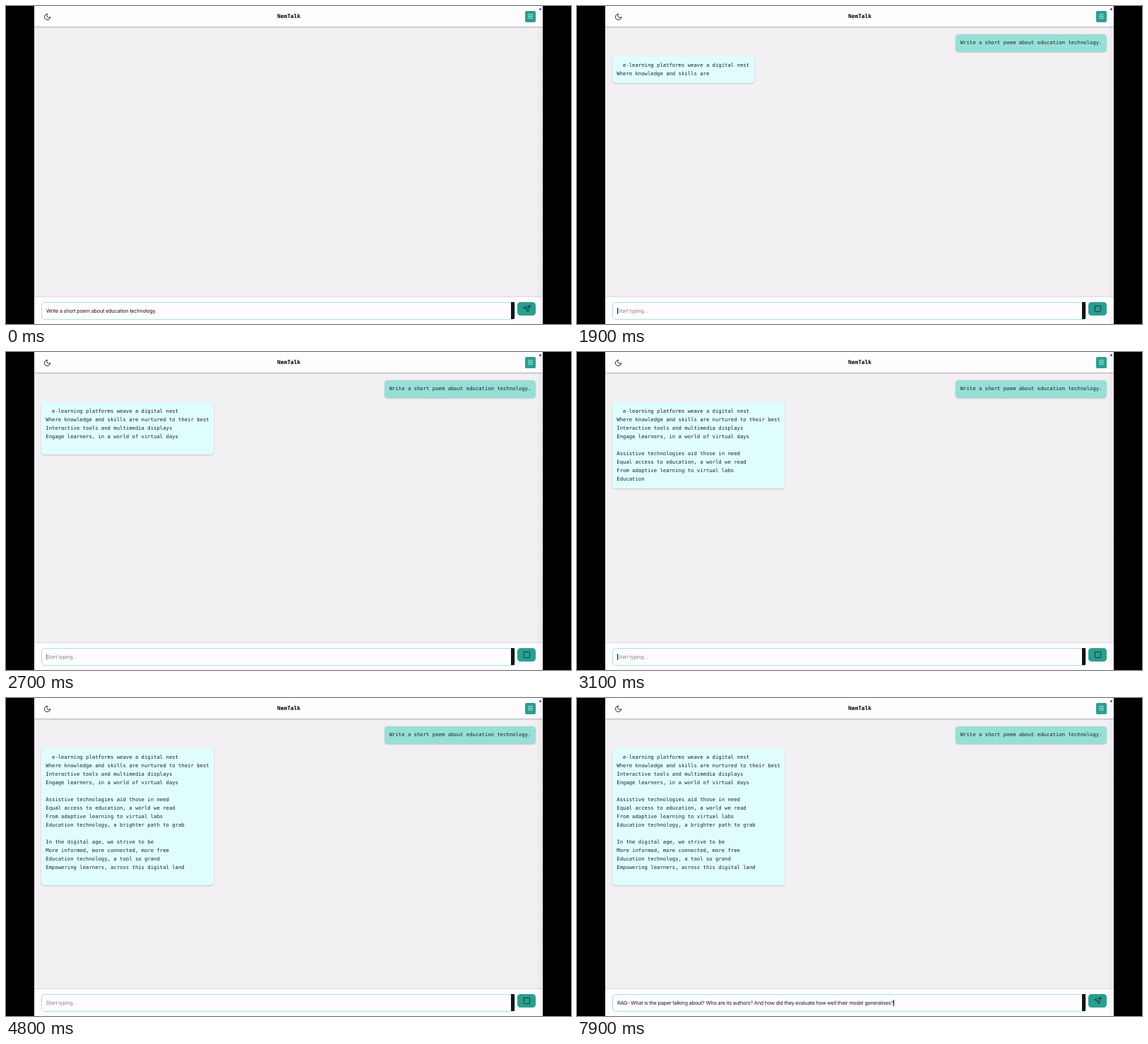
An HTML page for the animation above (8000 ms loop, 800 px wide and 450 px high).

```html
<!DOCTYPE html>
<html lang="en">
<head>
<meta charset="utf-8">
<title>Chat</title>
<style>
  html, body { margin: 0; width: 100%; height: 100%; overflow: hidden; background: #000; }
  #stage { position: absolute; left: 0; top: 0; width: 800px; height: 450px; overflow: hidden; text-rendering: geometricPrecision; }
  #stage div, #stage svg { position: absolute; box-sizing: border-box; }
  #page { left: 40px; top: 0; width: 720px; height: 450px; background: #f2f0f2; overflow: hidden; }
  #header, #footer { left: 0; width: 720px; background: #fefcfe; }
  #header { top: 0; height: 29px; box-shadow: 0 .5px 2px rgba(0, 0, 0, .28); }
  #footer { top: 412px; height: 38px; box-shadow: 0 -.5px 2px rgba(0, 0, 0, .25); }
  #edge { left: 711px; top: 0; width: 9px; height: 450px; background: linear-gradient(90deg, transparent, rgba(0, 0, 0, .04)); }
  #title { left: 0; top: 8.5px; width: 721px; text-align: center; font: bold 7.8px/12px "DejaVu Sans Mono", monospace; color: #000; }
  #menu { left: 694.7px; top: 7px; width: 15.6px; height: 15.5px; border-radius: 2px; background: #2a9f8f; }
  #dot { left: 714.5px; top: 2.5px; width: 3px; height: 3px; border-radius: 50%; background: #4b45b5; }
  .bubble { padding: 7px 6.5px; border-radius: 4.5px; white-space: pre; color: #18232a;
    font: 7.255px/12px "DejaVu Sans Mono", monospace; box-shadow: 0 .7px 2px rgba(0, 0, 0, .22); }
  #question { right: 10px; top: 40px; height: 25px; padding-top: 6px; background: #97dfd6; }
  #answer { left: 9.8px; top: 70.7px; background: #e0fdfe; }
  #input { left: 9.5px; top: 418.5px; width: 671px; height: 25px; border: 1px solid #a5e5dc; border-radius: 5px; background: #fefcfe; }
  #gutter { left: 675px; top: 419px; width: 5px; height: 24px; background: #121416; }
  #text { left: 17px; top: 426px; font: 7.26px/12px Inter, sans-serif; letter-spacing: -.19px; white-space: pre; color: #16181c; }
  #hint { color: #85858a; }
  #caret { display: inline-block; width: .9px; height: 9px; margin-right: -.9px; vertical-align: -2px; background: #111; }
  #send { left: 684px; top: 418.5px; width: 26px; height: 19.5px; border-radius: 4.5px; }
  svg { fill: none; stroke-width: 2; stroke-linecap: round; stroke-linejoin: round; }
</style>
</head>
<body>
<div id="stage">
  <div id="page">
    <div class="bubble" id="question">Write a short poem about education technology.</div>
    <div class="bubble" id="answer"></div>
    <div id="header"></div>
    <svg style="left:12.5px;top:9.5px" width="11" height="11" viewBox="0 0 24 24" stroke="#111"><path d="M12 3a6 6 0 0 0 9 9 9 9 0 1 1-9-9Z"/></svg>
    <div id="title">NemTalk</div>
    <div id="menu"><svg style="left:3.3px;top:3.3px" width="9" height="9" viewBox="0 0 24 24" stroke="#f2fffc"><path d="M4 5h16M4 12h16M4 19h16"/></svg></div>
    <div id="footer"></div>
    <div id="input"></div>
    <div id="gutter"></div>
    <div id="text"><span id="typed"></span><span id="caret"></span><span id="hint">Start typing...</span></div>
    <div id="send"><svg style="left:7.5px;top:4.3px" width="11" height="11" viewBox="0 0 24 24"><path id="icon"/></svg></div>
    <div id="edge"></div>
    <div id="dot"></div>
  </div>
</div>
<script>
const LOOP = 8000, SENT = 100, DONE = 5800, PASTED = 6700;
const el = id => document.getElementById(id);
const clamp = x => Math.max(0, Math.min(1, x));

const prompt1 = "Write a short poem about education technology.";
const prompt2 = "RAG- What is the paper talking about? Who are its authors? And how did they evaluate how well their model generalises?";
const poem = `  e-learning platforms weave a digital nest
Where knowledge and skills are nurtured to their best
Interactive tools and multimedia displays
Engage learners, in a world of virtual days

Assistive technologies aid those in need
Equal access to education, a world we read
From adaptive learning to virtual labs
Education technology, a brighter path to grab

In the digital age, we strive to be
More informed, more connected, more free
Education technology, a tool so grand
Empowering learners, across this digital land
`.split("\n");

// [time, lines written so far]
const stream = [[1500, 0], [2300, 3], [2500, 4], [2600, 4], [3100, 8], [3500, 9.5],
  [3600, 11], [3700, 11], [4100, 13.4], [4200, 13.4], [4400, 14], [4500, 15]];
// The caret alternately fades in and out at these times.
const blinks = [100, 1120, 1640, 2120, 2620, 3120, 3800, 4290, 4780, 5270, 5760, 6250, 6690, 7200, 7650];

const paperPlane = "M22 2 15 22 11 13 2 9ZM22 2 11 13";
const stopSquare = "M5 3H19A2 2 0 0 1 21 5V19A2 2 0 0 1 19 21H5A2 2 0 0 1 3 19V5A2 2 0 0 1 5 3Z";

function linesAt(t) {
  const next = stream.findIndex(([time]) => time > t);
  if (next === 0) return 0;
  if (next < 0) return poem.length;
  const [t0, a] = stream[next - 1], [t1, b] = stream[next];
  return a + (b - a) * (t - t0) / (t1 - t0);
}

function answerAt(t) {
  const progress = linesAt(t), whole = Math.floor(progress), part = progress - whole;
  const shown = poem.slice(0, whole);
  if (part > 0) {
    const words = poem[whole].split(" ");
    shown.push(words.slice(0, Math.ceil(part * words.length)).join(" "));
  }
  return shown.length ? shown.join("\n") + "\u200b" : "";
}

function caretAt(t) {
  const count = blinks.filter(time => time <= t).length;
  if (!count) return 0;
  const fade = clamp((t - blinks[count - 1]) / 180);
  return count % 2 ? fade : 1 - fade;
}

function draw(t) {
  const sent = t >= SENT, busy = sent && t < DONE;
  const typed = !sent ? prompt1 : t >= PASTED ? prompt2 : "";
  el("question").style.visibility = el("answer").style.visibility = sent ? "visible" : "hidden";
  el("answer").textContent = answerAt(t);
  el("typed").textContent = typed;
  el("hint").style.display = typed ? "none" : "inline";
  el("caret").style.opacity = caretAt(t);
  el("send").style.background = busy || typed ? "#2a9f8f" : "#d5d4d6";
  el("icon").setAttribute("d", busy ? stopSquare : paperPlane);
  el("icon").setAttribute("stroke", busy || typed ? "#15302e" : "#66676a");
}

function tick() {
  draw(performance.now() % LOOP);
  requestAnimationFrame(tick);
}
tick();
</script>
</body>
</html>
```
